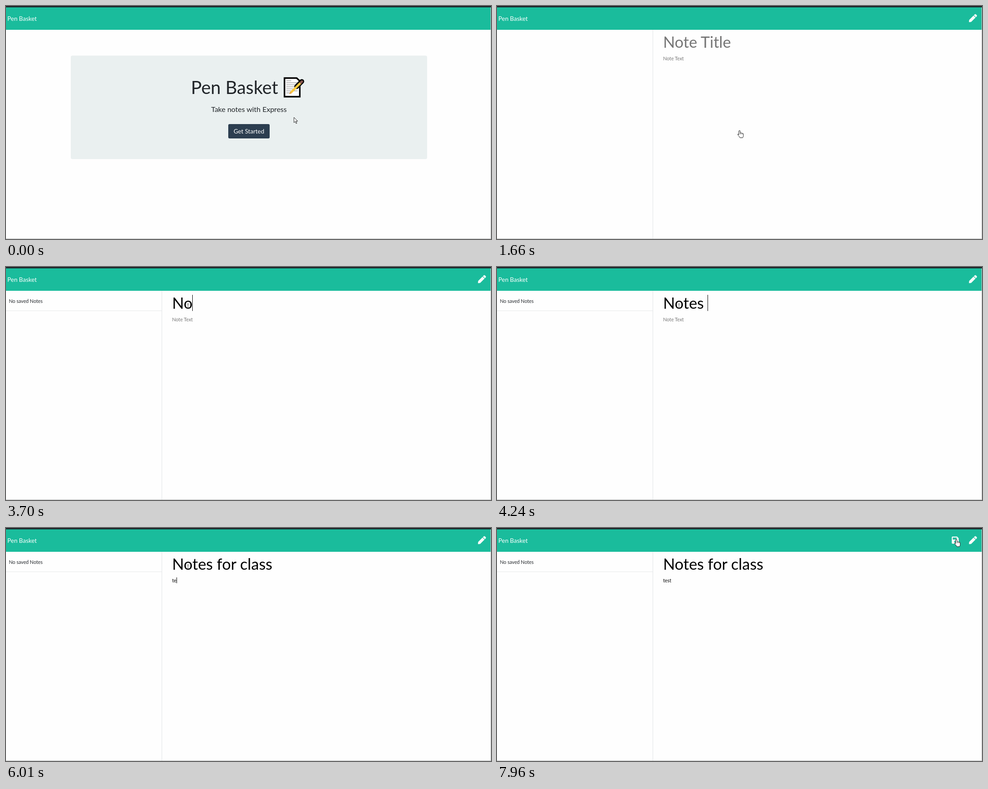
An HTML page that plays this animation: 1078 by 519 pixels, repeating every 8 s.

```html
<!DOCTYPE html>
<html lang="en">
<head>
<meta charset="utf-8">
<title>Pen Basket</title>
<style>
html, body { margin: 0; width: 100%; height: 100%; overflow: hidden; background: #fefefe; }
svg { display: block; width: 100%; height: 100%; }
text { font-family: Lato, sans-serif; white-space: pre; }
.brand, .label { font-size: 13.5px; fill: #fff; }
.small { font-size: 10.75px; }
.title { font-size: 34.5px; }
.hint { fill: #757575; }
.ink { fill: #212529; }
.caret { fill: #000; shape-rendering: crispEdges; }
.pointer { fill: #fff; stroke: #222; stroke-width: 1; stroke-linejoin: round; }
.beam { fill: none; stroke: #444; stroke-width: 1; }
</style>
</head>
<body>
<svg viewBox="0 0 1078 519">
  <rect width="1078" height="519" fill="#fefefe"/>
  <rect width="1078" height="3" fill="#1f2a2d"/>
  <rect y="3" width="1077" height="50" fill="#1abc9c"/>
  <text class="brand" x="3" y="32.5">Pen Basket</text>

  <g id="home">
    <rect x="144" y="110.5" width="792" height="230.5" rx="3.5" fill="#eaf0f0"/>
    <text class="ink" x="411" y="195.5" font-size="40">Pen Basket</text>
    <g id="memo">
      <path d="M619 160.5H646L653 167V202H619Z" fill="#fff" stroke="#000" stroke-width="3.4"/>
      <path id="lines" stroke="#a8a8a8" stroke-width="1.5"/>
      <path d="M646 179.500L657.500 168" stroke="#000" stroke-width="10.500" stroke-linecap="round"/>
      <path d="M634 192L655 171" stroke="#fbc93d" stroke-width="5"/>
      <path d="M629.500 196.500L632 190.200 635.800 194Z" fill="#e8a33a"/>
      <path d="M655.500 170.500L657.800 168.200" stroke="#8d5a52" stroke-width="5" stroke-linecap="round"/>
    </g>
    <text class="ink" x="540" y="236" font-size="16.05" text-anchor="middle">Take notes with Express</text>
    <rect id="ring" x="492.700" y="261.700" width="94.600" height="34.600" rx="4" fill="none" stroke="#929dab" stroke-width="2.400"/>
    <rect id="button" x="494" y="263" width="92" height="32" rx="3"/>
    <text class="label" x="540" y="284" text-anchor="middle">Get Started</text>
  </g>

  <g id="notes">
    <path d="M346.500 53V518" stroke="#e1e4e6"/>
    <g id="list">
      <path d="M0 97.500H346" stroke="#e6e9ea"/>
      <text class="small ink" x="6.500" y="79.500">No saved Notes</text>
    </g>
    <text id="head" class="title" x="369.300" y="93"></text>
    <text id="body" class="small" x="369.300" y="120.500"></text>
    <rect id="caret" class="caret" width="1"/>
    <g fill="#f7fbfa">
      <path transform="translate(1049 18) scale(.035)" d="M290 93L419 221 141 499 26 512Q-2 514 0 486L13 371ZM498 74Q525 108 498 142L441 199 313 71 370 14Q404-12 438 14Z"/>
      <g id="save">
        <path d="M1012.700 19H1022.500L1026.200 22.700V33.300Q1026.200 35 1024.500 35H1012.500Q1010.800 35 1010.800 33.300V20.700Q1010.800 19 1012.700 19Z"/>
        <path d="M1013 21.300H1021.700V25.700H1013Z" fill="#1abc9c"/>
        <circle cx="1018.500" cy="30.400" r="2.300" fill="#1abc9c"/>
      </g>
    </g>
  </g>

  <path d="M1077.500 3V519" stroke="#c2c4c4"/>
  <path d="M0 518.500H1078" stroke="#b4b6b6"/>

  <path id="arrow" class="pointer" d="M.5 .5V12.300L3.300 9.700 5.300 14.300 7.100 13.500 5.100 9H8.800Z"/>
  <g id="hand" class="pointer">
    <path d="M-1 10V2A1.500 1.500 0 0 1 2 2V6Q3.300 4.800 4.500 6.200 5.800 5.300 7 6.800 9 6.200 9 8.300V11.500Q9 14.500 7.500 16.500H1.500Q.5 14-2 11.500-4 9-3.500 8.500-2.300 7.500-1 10Z"/>
    <path d="M2 6V9M4.500 6.500V9M7 7V9" stroke-width=".7"/>
  </g>
  <path id="beam" class="beam" d="M-2.500-4.500H-.8L0-4 .8-4.500H2.500M0-4V4M-2.500 4.500H-.8L0 4 .8 4.500H2.500"/>
</svg>
<script>
const LOOP = 8000;
const $ = id => document.getElementById(id);
const show = (id, on) => $(id).setAttribute('visibility', on ? 'inherit' : 'hidden');
const at = (keys, t) => keys.findLast(key => t >= key[0]);

// The pointer jumps between sampled places: time, shape, x, y
const pointer = [
  [0, 'arrow', 639.5, 247.5], [260, 'arrow', 625, 253], [390, 'arrow', 590, 266],
  [510, 'hand', 550, 276], [640, 'hand', 538.5, 277],
  [1900, 'arrow', 522, 257], [2030, 'arrow', 475, 203], [2150, 'beam', 430, 150],
  [2310, 'beam', 408.5, 124], [2470, 'beam', 403.5, 117], [2720, 'beam', 403.5, 96.5],
  [2860, 'beam', 403.5, 91.5], [3000, 'beam', 404.5, 86.5],
  [7050, 'beam', 424.5, 85.5], [7180, 'beam', 520.5, 78.5], [7310, 'beam', 680.5, 68.5],
  [7440, 'arrow', 845, 51], [7570, 'arrow', 950, 38], [7700, 'hand', 1013, 27],
  [7830, 'hand', 1018, 25], [7960, 'hand', 1020.5, 25]
];

// Typing: time, number of letters
const headText = 'Notes for class';
const headKeys = [[0, 0], [3450, 1], [3600, 2], [3720, 3], [3850, 4], [3980, 5], [4240, 6],
  [4490, 8], [4640, 10], [4920, 11], [5060, 12], [5200, 13], [5340, 15]];
const bodyText = 'test';
const bodyKeys = [[0, 0], [6010, 2], [6130, 3], [6250, 4]];

// Focused field; empty while the caret is dark
const caretKeys = [[0, ''], [2720, 'body'], [3140, 'head'], [5480, 'body'],
  [6750, ''], [7250, 'body'], [7750, '']];

let rows = 'M623 166.500H634';
for (let i = 1; i < 7; i++) rows += `M623 ${166.5 + i * 4.5}H${i < 6 ? 648 : 634}`;
$('lines').setAttribute('d', rows);

function typeInto(id, text, count, hint) {
  const field = $(id);
  const value = count ? text.slice(0, count) : hint;
  if (field.textContent !== value) field.textContent = value;
  field.classList.toggle('hint', !count);
}

function placeCaret(id, count) {
  show('caret', id !== '');
  if (!id) return;
  const caret = $('caret');
  const width = count ? $(id).getComputedTextLength() : 0;
  caret.setAttribute('x', Math.round(369 + width));
  caret.setAttribute('y', id === 'head' ? 62 : 110);
  caret.setAttribute('height', id === 'head' ? 36 : 13);
}

function draw(t) {
  const onNotes = t >= 1660;
  show('home', !onNotes);
  show('notes', onNotes);

  const hover = t >= 510;
  $('button').setAttribute('fill', t >= 1290 ? '#1c2833' : hover ? '#1e2b37' : '#2c3e50');
  show('ring', t >= 1290 && !onNotes);

  show('list', t >= 1780 && onNotes);
  show('save', t >= 6130);
  const counts = { head: at(headKeys, t)[1], body: at(bodyKeys, t)[1] };
  typeInto('head', headText, counts.head, 'Note Title');
  typeInto('body', bodyText, counts.body, 'Note Text');
  const focus = at(caretKeys, t)[1];
  placeCaret(focus, counts[focus]);

  const [, shape, x, y] = at(pointer, t);
  for (const id of ['arrow', 'hand', 'beam']) show(id, id === shape);
  $(shape).setAttribute('transform', `translate(${x} ${y})`);
}

const start = performance.now();
function tick() {
  draw((performance.now() - start) % LOOP);
  requestAnimationFrame(tick);
}
tick();
</script>
</body>
</html>
```
